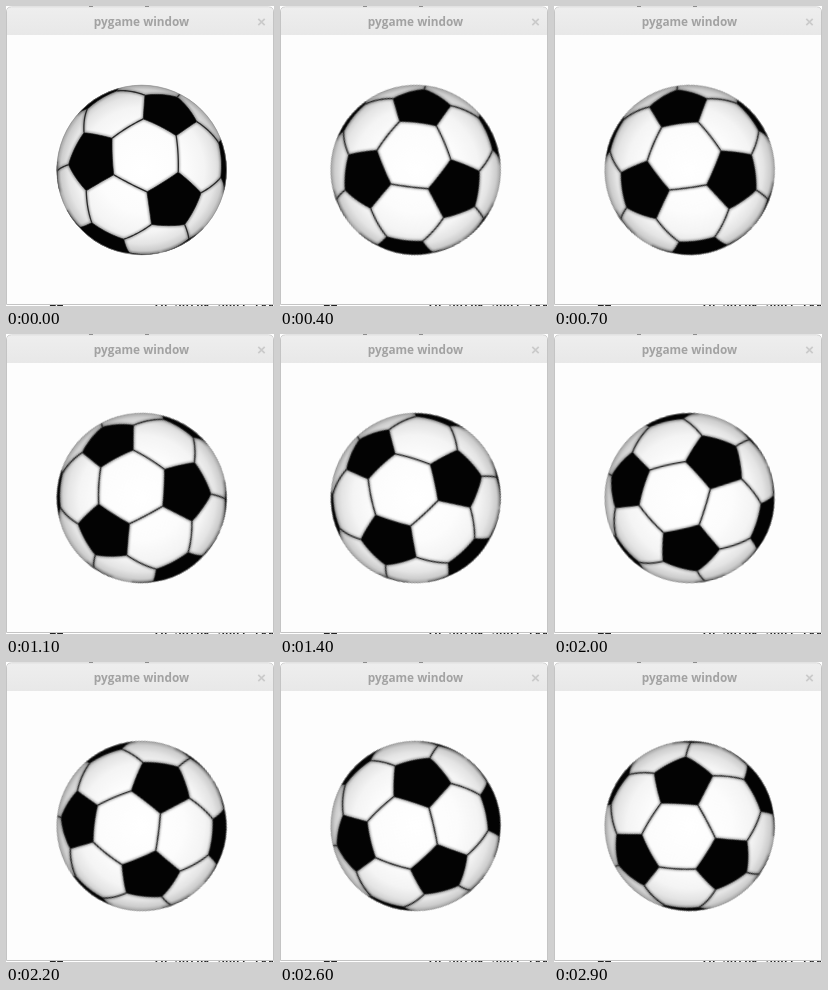
Animation of 268x300 px, one loop 3 s. Source, as an HTML page:

```html
<!DOCTYPE html>
<html lang="en">
<head>
<meta charset="utf-8">
<title>pygame window</title>
<style>
  html, body { margin: 0; width: 100%; height: 100%; overflow: hidden; background: #fff; }
  svg { display: block; }
  #ball { transform-origin: 135.7px 164px; animation: spin 3s steps(30, end) infinite; }
  @keyframes spin { to { transform: rotate(-150deg); } }
  .title { font: 700 11.8px "Open Sans", sans-serif; fill: #a2a2a2; text-anchor: middle; }
  .behind { font: 700 12px "Liberation Mono", monospace; fill: #222; }
</style>
</head>
<body>
<svg width="268" height="300" viewBox="0 0 268 300">
  <defs>
    <radialGradient id="shade">
      <stop offset="0" stop-color="#fff"/>
      <stop offset=".5" stop-color="#fcfcfc"/>
      <stop offset=".74" stop-color="#f4f4f4"/>
      <stop offset=".87" stop-color="#e4e4e4"/>
      <stop offset=".95" stop-color="#cdcdcd"/>
      <stop offset="1" stop-color="#a4a4a4"/>
    </radialGradient>
    <linearGradient id="bar" x2="0" y2="1">
      <stop offset="0" stop-color="#eee"/>
      <stop offset="1" stop-color="#e8e8e8"/>
    </linearGradient>
    <filter id="soft" x="-10%" y="-10%" width="120%" height="120%"><feGaussianBlur stdDeviation="1.1"/></filter>
    <clipPath id="disc"><circle cx="135.7" cy="164" r="85"/></clipPath>
  </defs>

  <path d="M83 .5h4M139 .5h4" stroke="#555"/>
  <text class="behind" x="43" y="305">■■</text>
  <text class="behind" x="147" y="305.5">(0,30[01,300],[1111]</text>

  <path d="M.5 298.5V6q0-5 5-5h257q5 0 5 5v292.5z" fill="#fdfdfd" stroke="#c4c4c4"/>
  <path d="M1 29V6q0-4.5 4.5-4.5h257q4.5 0 4.5 4.5v23z" fill="url(#bar)"/>
  <text class="title" x="135.5" y="20">pygame window</text>
  <path d="M252.3 12.8l6.4 6.4m0-6.4l-6.4 6.4" stroke="#cacaca" stroke-width="1.7"/>

  <g id="ball">
    <circle cx="135.7" cy="164" r="85" fill="url(#shade)"/>
    <g clip-path="url(#disc)" stroke-linejoin="round">
      <path class="all" fill="none" stroke="#000" stroke-width="3" opacity=".35" filter="url(#soft)"/>
      <path class="pents" fill="#030303" stroke="#1c1c1c" stroke-width=".7"/>
      <path class="seams" fill="none" stroke="#2a2a2a" stroke-width="1.3"/>
    </g>
    <circle cx="135.7" cy="164" r="84.8" fill="none" stroke="#888" stroke-width=".6"/>
  </g>
</svg>
<script>
const CX = 135.7, CY = 164, R = 85, EYE = 11;
const SPIN = -62.4, TILT_X = 0.041, TILT_Y = -0.176;
const rad = a => a * Math.PI / 180;
const dot = (a, b) => a[0] * b[0] + a[1] * b[1] + a[2] * b[2];
const mix = (a, b, t) => {
  const v = a.map((n, i) => n + (b[i] - n) * t), len = Math.hypot(...v);
  return v.map(n => n / len);
};

// Icosahedron direction seen along a three-fold axis, then tilted
function direction(azimuth, polar) {
  const a = rad(azimuth + SPIN), p = rad(polar);
  const x = Math.sin(p) * Math.cos(a), y = Math.sin(p) * Math.sin(a), z = Math.cos(p);
  const u = Math.asin(TILT_Y), v = Math.asin(TILT_X);
  const y2 = y * Math.cos(u) + z * Math.sin(u), z2 = z * Math.cos(u) - y * Math.sin(u);
  return [x * Math.cos(v) + z2 * Math.sin(v), y2, z2 * Math.cos(v) - x * Math.sin(v)];
}

const visible = p => p[2] > 1 / EYE;
function project(p) {
  const k = visible(p)
    ? R * Math.sqrt(EYE * EYE - 1) / (EYE - p[2])
    : (R + 2) / Math.hypot(p[0], p[1]);
  return (CX + p[0] * k).toFixed(2) + " " + (CY + p[1] * k).toFixed(2);
}
const arc = (a, b) => Array.from({ length: 17 }, (_, i) => mix(a, b, i / 16));
const line = pts => pts.length > 1 ? "M" + pts.map(project).join("L") : "";

const centers = [];
for (let k = 0; k < 6; k++) {
  const c = direction(k * 60, k % 2 ? 79.188 : 37.377);
  centers.push(c, c.map(n => -n));
}

let pents = "", seams = "";
for (const c of centers) {
  const near = centers.filter(n => Math.abs(dot(c, n) - 0.447) < 0.01);
  // Walk around the pentagon from neighbour to neighbour
  const ring = [near.shift()];
  while (near.length) {
    const i = near.findIndex(n => dot(n, ring[ring.length - 1]) > 0.4);
    ring.push(near.splice(i, 1)[0]);
  }
  const corners = ring.map(n => mix(c, n, 1 / 3));
  const edge = corners.flatMap((p, i) => arc(p, corners[(i + 1) % 5]));
  if (edge.some(visible)) pents += line(edge) + "Z";
  for (const n of ring)
    if (centers.indexOf(n) > centers.indexOf(c))
      seams += line(arc(mix(c, n, 1 / 3), mix(c, n, 2 / 3)).filter(visible));
}
const set = (name, d) => document.querySelector("." + name).setAttribute("d", d);
set("pents", pents);
set("seams", seams);
set("all", pents + seams);
</script>
</body>
</html>
```
